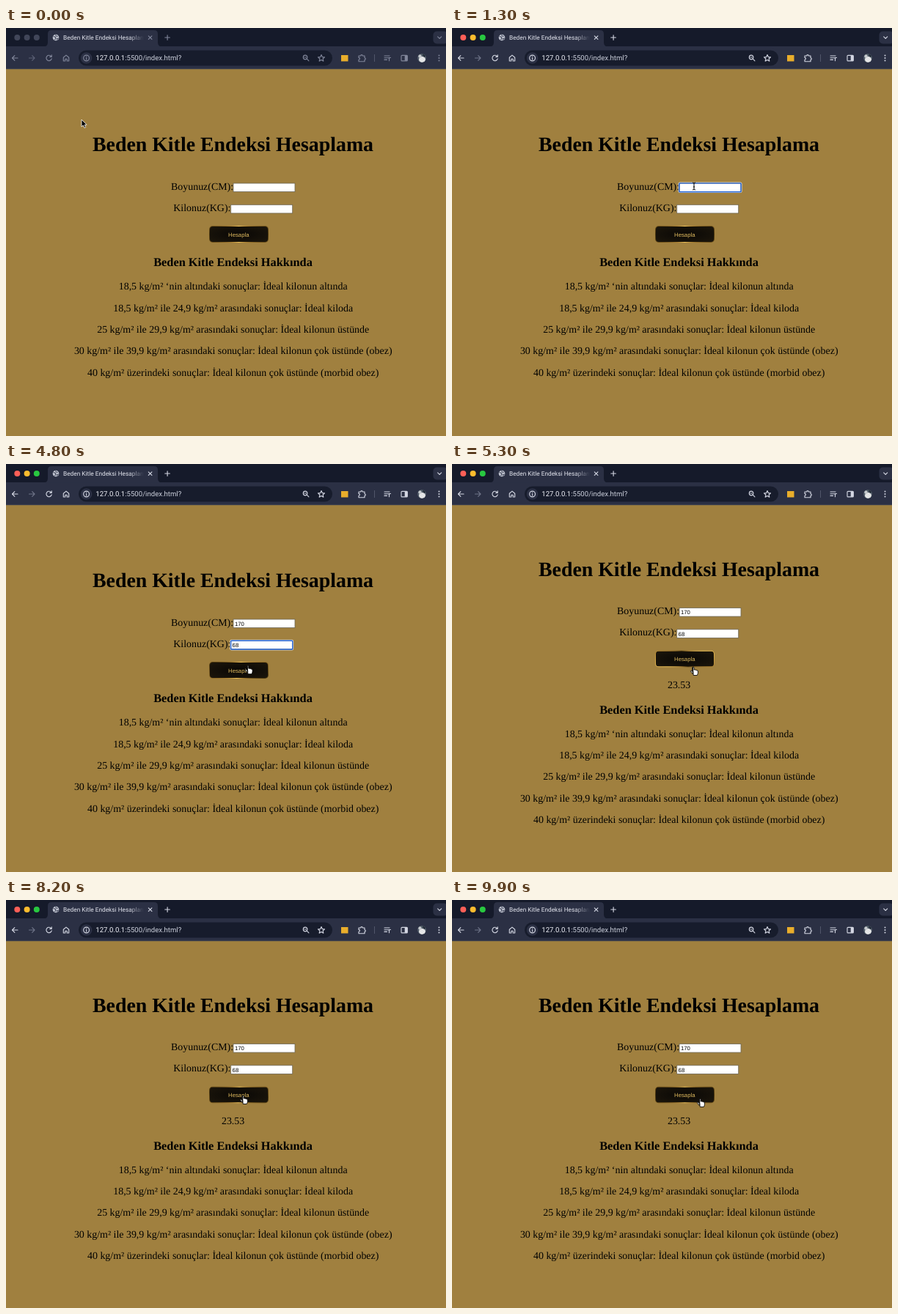
These frames come from a looping animation (600 px wide and 557 px high, 10000 ms). An HTML page:

```html
<!DOCTYPE html>
<html lang="tr">
<head>
<meta charset="utf-8">
<title>Beden Kitle Endeksi Hesaplama</title>
<style>
  html, body { margin: 0; width: 100%; height: 100%; overflow: hidden; background: #a0803f; }
  svg { display: block; width: 600px; height: 557px; }
  text { text-rendering: geometricPrecision; white-space: pre; }
  .page { font: 13.93px "Liberation Serif", "Times New Roman", serif; fill: #000; }
  .mid { text-anchor: middle; }
  .h1 { font-size: 27.87px; font-weight: bold; }
  .h3 { font-size: 16.35px; font-weight: bold; }
  .small { font: 7.75px "Liberation Sans", Arial, sans-serif; }
  .ui { font-family: Roboto, "Liberation Sans", sans-serif; }
  .icon { fill: none; stroke: #d3d6e2; stroke-width: 1.15; stroke-linecap: round; stroke-linejoin: round; }
  .dim { stroke: #6f7488; }
  .inactive .icon { stroke: #81869a; }
  .inactive .dim { stroke: #5c6175; }
  .inactive .fillIcon { fill: #81869a; }
  .fillIcon { fill: #d3d6e2; }
  .inactive .lights circle { fill: #414659; }
  .ring { fill: none; visibility: hidden; }
  .button {
    box-sizing: border-box; width: 81px; height: 23px; border-radius: 5px;
    border: 1.6px solid transparent;
  }
</style>
</head>
<body>
<svg id="stage" viewBox="0 0 600 557" class="inactive">
  <defs>
    <linearGradient id="fade" gradientUnits="userSpaceOnUse" x1="168" x2="188" y1="0" y2="0">
      <stop offset="0" stop-color="#e3e5ee"/>
      <stop offset="1" stop-color="#e3e5ee" stop-opacity="0"/>
    </linearGradient>
    <clipPath id="face"><circle cx="567" cy="41" r="6"/></clipPath>
  </defs>
  <rect width="600" height="557" fill="#a0803f"/>

  <g id="browser">
    <rect width="600" height="26" fill="#151a2a"/>
    <rect y="25" width="600" height="31" fill="#2b3044"/>
    <rect y="55.3" width="600" height=".9" fill="#3d4052"/>
    <path d="M51 25.5q6 0 6-6V8q0-5 5-5H202q5 0 5 5V19.500q0 6 6 6z" fill="#2b3044"/>
    <g class="lights">
      <circle cx="15.300" cy="13" r="4" fill="#fe5f57"/>
      <circle cx="28.600" cy="13" r="4" fill="#febc2e"/>
      <circle cx="41.800" cy="13" r="4" fill="#28c840"/>
    </g>
    <circle cx="68" cy="13" r="4.300" fill="#c4c8d4"/>
    <path d="M64.500 11.500l3 1 .5 1.600-1.600 2M67.500 9.300l1 1.700 2.400.3M69.500 16.500l.3-2 2.100-.5" fill="none" stroke="#3a3f53" stroke-width="1.100"/>
    <text class="ui" x="78" y="15.900" font-size="8.300" fill="url(#fade)">Beden Kitle Endeksi Hesaplama</text>
    <path class="icon" d="M194.300 10.800l4.600 4.600m0-4.600l-4.600 4.600M216.800 13h6.600M220.100 9.700v6.600"/>
    <rect x="582.500" y="4.500" width="20" height="17" rx="5" fill="#2b3044"/>
    <path class="icon" d="M588.700 11.800l2.500 2.500 2.500-2.500"/>

    <rect x="99" y="30.500" width="346" height="21" rx="10.500" fill="#171c2c"/>
    <path class="icon" d="M16 41H8.500m3.300-3.300L8.500 41l3.300 3.300"/>
    <path class="icon dim" d="M31.500 41H39m-3.300-3.300L39 41l-3.300 3.300"/>
    <path class="icon" d="M61.600 38.800A3.700 3.700 0 1 0 62.200 41.900M62.200 36.800v2.500h-2.500"/>
    <path class="icon" d="M78.300 40.300L82 37.100l3.700 3.200V45h-2.500v-2.800h-2.400V45h-2.500z"/>
    <circle cx="109.600" cy="41" r="7.800" fill="#2b3044"/>
    <path class="icon" d="M105.700 41a3.900 3.900 0 1 0 7.800 0a3.900 3.900 0 1 0-7.800 0M109.600 40.900v2M109.600 39.100v.1"/>
    <text class="ui" x="122.300" y="44.300" font-size="9.600" fill="#f0f2f8">127.0.0.1<tspan fill="#ccd0dc">:5500/index.html?</tspan></text>
    <path class="icon" d="M405.300 40a2.800 2.800 0 1 0 5.600 0a2.800 2.800 0 1 0-5.600 0M410.300 42.200l2.600 2.600M407 40h2.200"/>
    <path class="icon" d="M430 36.600l1.300 3 3.200.3-2.400 2.100.7 3.200-2.800-1.700-2.800 1.700.7-3.200-2.400-2.100 3.200-.3z"/>
    <rect x="457" y="37" width="9.500" height="8.500" fill="#e9ae2b"/>
    <path class="icon" d="M481 38h2.700a1.300 1.300 0 0 1 2.600 0H489v2.700a1.300 1.300 0 0 1 0 2.600v2.400h-8v-2.500a1.400 1.400 0 0 0 0-2.800z"/>
    <path d="M502.500 36v10" stroke="#51566a"/>
    <path class="icon" d="M516 38h7M516 40.700h7M516 43.400h3.500M522.500 44.700v-4.200h2"/>
    <rect class="icon" x="539" y="37.300" width="8.300" height="7.600" rx="1"/>
    <rect class="fillIcon" x="543.700" y="37.300" width="3.600" height="7.600"/>
    <g clip-path="url(#face)">
      <rect x="560" y="34" width="14" height="14" fill="#4d5864"/>
      <ellipse cx="567.500" cy="43" rx="4.500" ry="4" fill="#e4e5e6"/>
      <circle cx="564.500" cy="38.500" r="2.200" fill="#c6cacd"/>
      <path d="M568 35l4 3-2 2z" fill="#1d2530"/>
    </g>
    <g class="fillIcon">
      <circle cx="590.500" cy="37.500" r="1"/><circle cx="590.500" cy="41" r="1"/><circle cx="590.500" cy="44.500" r="1"/>
    </g>
  </g>

  <g class="page">
    <g id="upper">
      <text class="h1 mid" x="309.500" y="168">Beden Kitle Endeksi Hesaplama</text>
      <text x="225" y="220.500">Boyunuz(CM):</text>
      <text x="228.300" y="249.800">Kilonuz(KG):</text>
      <g id="fields"></g>
      <foreignObject x="274" y="267" width="90" height="30">
        <div xmlns="http://www.w3.org/1999/xhtml" style="padding:3px"><div class="button" id="button"></div></div>
      </foreignObject>
      <text class="small mid" x="317.300" y="284.500" fill="#e3bd60">Hesapla</text>
    </g>
    <text id="result" class="mid" x="309.600" y="305.800">23.53</text>
    <g id="lower">
      <text class="h3 mid" x="309.500" y="325">Beden Kitle Endeksi Hakkında</text>
    </g>
  </g>

  <g id="cursor" stroke-linejoin="round">
    <path id="arrow" d="M0 0V9.800L2.300 7.800 3.900 11.300 5.700 10.500 4.200 7.100H7.200z" fill="#000" stroke="#fff" stroke-width=".8"/>
    <path id="beam" d="M-2-5Q0-5 0-3.800Q0-5 2-5M0-3.800V3.800M-2 5Q0 5 0 3.800Q0 5 2 5M-1 .9H1" fill="none" stroke="#000" stroke-width="1"/>
    <path id="hand" d="M-1.200.8Q0-.8 1.100.8V4Q2.300 3.200 3 4.300Q4.200 3.700 4.800 4.800Q6.300 4.300 6.400 6V8.200Q6.200 9.800 5.300 11.500H.2Q-1-9.900-.8 9.500Q-2.600 7.600-3.600 5.700Q-3.200 4.600-1.900 5.500L-1.200 6.200z" fill="#fff" stroke="#000" stroke-width=".85"/>
  </g>
</svg>
<script>
const $ = id => document.getElementById(id);
const LOOP = 10000, TICK = 100;
const ACTIVE = 1000, CLICK = 5000, HOVER = 4650, HALF_TURN = 1750, SHIFT = 15.5;

const facts = [
  "18,5 kg/m² ‘nin altındaki sonuçlar: İdeal kilonun altında",
  "18,5 kg/m² ile 24,9 kg/m² arasındaki sonuçlar: İdeal kiloda",
  "25 kg/m² ile 29,9 kg/m² arasındaki sonuçlar: İdeal kilonun üstünde",
  "30 kg/m² ile 39,9 kg/m² arasındaki sonuçlar: İdeal kilonun çok üstünde (obez)",
  "40 kg/m² üzerindeki sonuçlar: İdeal kilonun çok üstünde (morbid obez)"
];

// Each field: position, focus interval, and text by time.
const fields = [
  { x: 310, y: 212, focus: [1100, 3200], keys: [[0, ""], [2300, "1"], [2400, "17"], [2600, "170"]] },
  { x: 306.7, y: 241.3, focus: [3200, 4900], keys: [[0, ""], [3600, "6"], [3700, "68"]] }
];

const path = [
  [0, 103, 125], [100, 103, 125], [900, 330, 216], [3900, 330, 216],
  [4650, 331, 272], [4900, 329, 277], [5400, 329, 277], [5950, 422, 324],
  [7150, 422, 324], [8000, 323, 267], [8300, 323, 267], [9000, 334, 268], [9900, 338, 271]
];
const shapes = [
  [0, "arrow"], [800, "beam"], [2300, ""], [3900, "beam"], [4200, "arrow"],
  [HOVER, "hand"], [5600, "arrow"], [7800, "hand"]
];

function add(parent, tag, attrs, text = "") {
  const el = document.createElementNS("http://www.w3.org/2000/svg", tag);
  for (const key in attrs) el.setAttribute(key, attrs[key]);
  el.textContent = text;
  return parent.appendChild(el);
}

facts.forEach((line, i) =>
  add($("lower"), "text", { class: "mid", x: 309.7, y: 357.2 + i * 29.35 }, line));

for (const f of fields) {
  const frame = (pad, attrs) => add($("fields"), "rect", {
    x: f.x - pad, y: f.y - pad, width: 84 + pad * 2, height: 11.6 + pad * 2, ...attrs
  });
  frame(0, { fill: "#fff", stroke: "#6d6655", "stroke-width": .8 });
  f.rings = [
    frame(.9, { class: "ring", rx: 1.3, stroke: "#fff", "stroke-width": 1 }),
    frame(.1, { class: "ring", rx: .8, stroke: "#1f5fd0", "stroke-width": 1.4 })
  ];
  f.label = add($("fields"), "text", { class: "small", x: f.x + 1.9, y: f.y + 8.7 });
}

const latest = (steps, t) => steps.reduce((now, [at, value]) => at <= t ? value : now, "");

function place(t) {
  const i = path.findIndex(p => p[0] > t);
  if (i < 0) return path[path.length - 1].slice(1);
  const [a, b] = [path[i - 1], path[i]];
  const u = (t - a[0]) / (b[0] - a[0]), e = u * u * (3 - 2 * u);
  return [1, 2].map(k => a[k] + (b[k] - a[k]) * e);
}

function draw(t) {
  const done = t >= CLICK, dy = done ? SHIFT : 0;
  $("stage").classList.toggle("inactive", t < ACTIVE);
  $("upper").setAttribute("transform", `translate(0 ${-dy})`);
  $("lower").setAttribute("transform", `translate(0 ${dy})`);
  $("result").style.visibility = done ? "visible" : "hidden";

  for (const f of fields) {
    const on = t >= f.focus[0] && t < f.focus[1];
    f.rings.forEach(r => r.style.visibility = on ? "visible" : "hidden");
    f.label.textContent = latest(f.keys, t);
  }

  const angle = Math.max(0, t - HOVER) / HALF_TURN * 180;
  $("button").style.background =
    "radial-gradient(#090705, #1c160b) padding-box, " +
    `repeating-conic-gradient(from ${angle}deg, #f4c65a 0deg, #a87d2e 45deg, ` +
    "#49360f 90deg, #a87d2e 135deg, #f4c65a 180deg) border-box";

  const [x, y] = place(t), shape = latest(shapes, t);
  $("cursor").setAttribute("transform", `translate(${x} ${y})`);
  for (const id of ["arrow", "beam", "hand"]) $(id).style.display = id === shape ? "" : "none";
}

const start = performance.now();
function loop() {
  const t = (performance.now() - start) % LOOP;
  draw(Math.floor(t / TICK) * TICK);
  requestAnimationFrame(loop);
}
loop();
</script>
</body>
</html>
```
